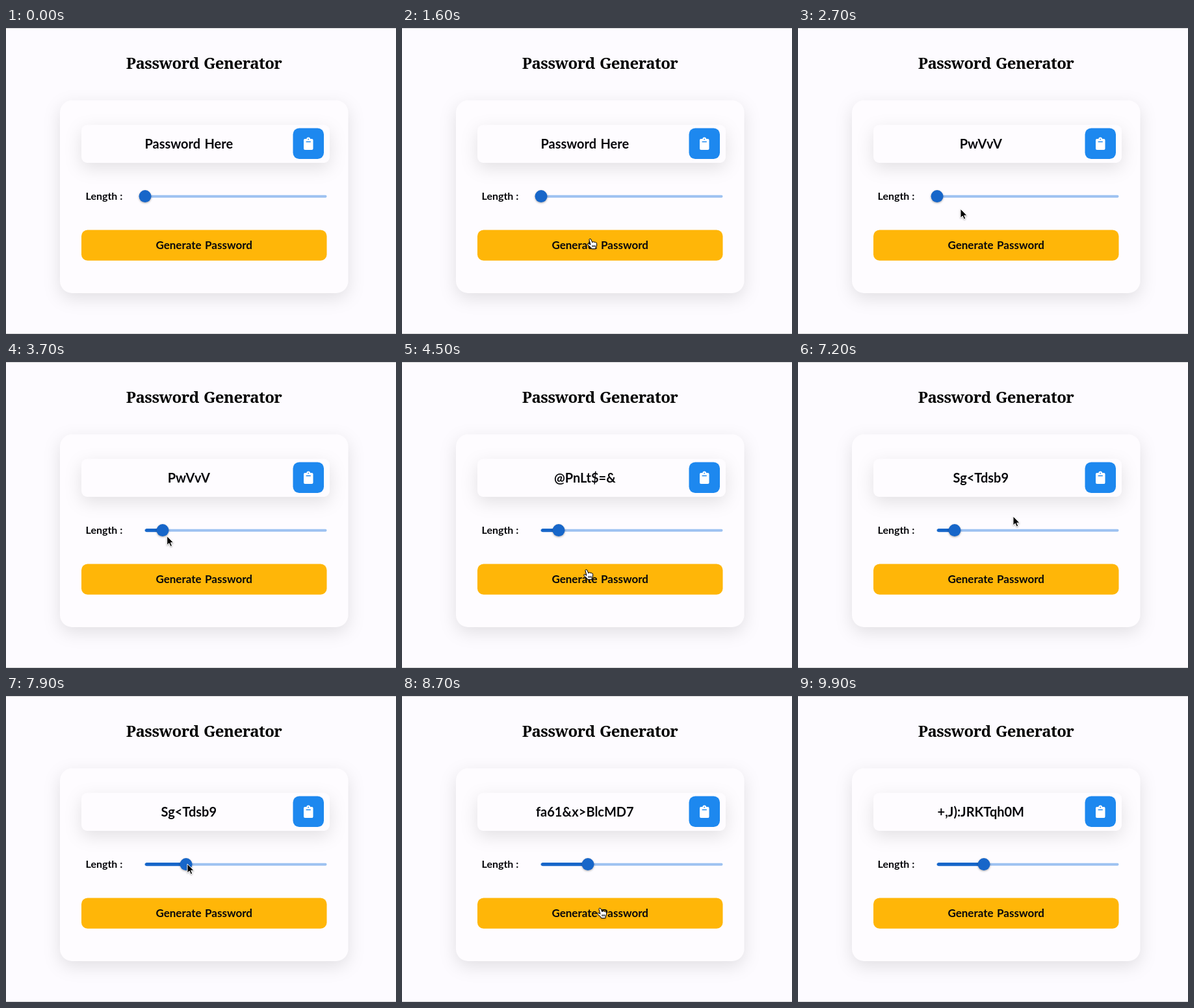
Write an HTML page that moves like this. It is 600 px wide and 472 px high and loops after 10 s.

```html
<!DOCTYPE html>
<html lang="en">
<head>
<meta charset="utf-8">
<title>Password Generator</title>
<style>
  html, body { margin: 0; width: 100%; height: 100%; overflow: hidden; background: #fdfbff; }
  svg { display: block; }
  text { font: 700 20px Lato, sans-serif; fill: #08080c; word-spacing: 1.5px; }
  .middle { text-anchor: middle; }
  .title { font: 700 24px "Noto Serif", serif; letter-spacing: -.55px; fill: #000; }
  .label { font-size: 16px; word-spacing: 0; }
  .action { font-size: 17px; }
  .panel { fill: #fefcff; filter: drop-shadow(0 8px 13px rgba(0, 0, 0, .11)); }
  .track { fill: #9ec2f1; }
  .active { fill: #1766c9; }
  #knob { filter: drop-shadow(0 1px 1.5px rgba(0, 0, 0, .35)); }
  #cursor { filter: drop-shadow(0 1px 1px rgba(0, 0, 0, .3)); }
</style>
</head>
<body>
<svg width="600" height="472" viewBox="0 0 600 472">
  <path d="M0 .5H600M0 471.5H600" stroke="#d2d1d4"/>
  <text class="title middle" x="304.5" y="63">Password Generator</text>
  <rect class="panel" x="83" y="111.5" width="443.5" height="297.5" rx="19"/>
  <rect class="panel" x="116" y="149.5" width="382" height="58.5" rx="9"/>
  <text id="password" class="middle" x="281.3" y="185.5"></text>

  <rect x="441.5" y="154.5" width="47.5" height="47.5" rx="9.5" fill="#1d88ef"/>
  <rect x="458" y="171" width="14.5" height="17" rx="2" fill="#fff"/>
  <circle cx="465.2" cy="171.4" r="2.8" fill="#fff"/>
  <path d="M461.6 175.5H468.8" stroke="#1d88ef" stroke-width="1.5"/>
  <circle cx="465.2" cy="171.6" r=".9" fill="#1d88ef"/>

  <text class="label" x="122.5" y="265.3">Length :</text>
  <rect class="track" x="213" y="257.7" width="280.5" height="4" rx="2"/>
  <rect id="fill" class="active" x="214" y="257" height="5.2" rx="2.6"/>
  <circle id="knob" class="active" cy="259.6" r="9.5"/>

  <rect x="116" y="311.5" width="377.5" height="47.2" rx="9.5" fill="#ffb608"/>
  <text class="action middle" x="304.7" y="341">Generate Password</text>

  <g id="cursor">
    <path id="arrow" d="M0 0V14L3.2 11L5.4 16L7.8 15L5.7 10.2H10Z" fill="#000" stroke="#fff"/>
    <path id="hand" d="M-2 1.6Q-1.6-.6 .5 .6L3 6L3.5 5Q5 4 6 5.5Q7.5 4.6 8.2 6.2Q9.5 5.6 9.6 7.5L9.4 11L8 13.5V15.5H1.5L1 14L-4 9.5Q-5 7.6-3 7.5L0 9.3ZM3 10V13M5 10V13M7 10V13"
          fill="#fff" stroke="#000" stroke-linejoin="round"/>
  </g>
</svg>
<script>
  const LOOP = 10000, STEP = 100, GLIDE = 400;
  const SLIDER_LEFT = 214, NOTCH = 9;
  const $ = id => document.getElementById(id);

  // Pointer stops, each reached at time `at` after one glide
  const stops = [
    { at: 900, x: 296, y: 418 },
    { at: 1500, x: 290, y: 325 },
    { at: 2700, x: 250, y: 279 },
    { at: 3100, x: 214, y: 259 },
    { at: 3500, x: 241, y: 259 },
    { at: 4000, x: 284, y: 320 },
    { at: 5600, x: 457, y: 176 },
    { at: 7200, x: 331, y: 238 },
    { at: 7600, x: 241, y: 259 },
    { at: 8000, x: 286, y: 259 },
    { at: 8400, x: 305, y: 327 },
    { at: 9500, x: 569, y: 300 }
  ];
  const passwords = ["Password Here", "PwVvV", "@PnLt$=&", "Sg<Tdsb9", "fa61&x>BlcMD7", "+,J):JRKTqh0M"];
  const clicks = [1800, 4200, 5000, 8500, 8900];

  // Eased progress, 0 to 1, of the glide that ends at time `at`
  function glide(t, at) {
    const u = Math.min(1, Math.max(0, 1 + (t - at) / GLIDE));
    return u * u * (3 - 2 * u);
  }

  const along = (axis, t) => stops.slice(1).reduce(
    (sum, stop, i) => sum + (stop[axis] - stops[i][axis]) * glide(t, stop.at), stops[0][axis]);

  const inside = (x, y, left, top, width, height) =>
    x >= left && x <= left + width && y >= top && y <= top + height;

  const show = (id, visible) => $(id).setAttribute("visibility", visible ? "visible" : "hidden");

  function draw(now) {
    const t = Math.floor(now % LOOP / STEP) * STEP;
    $("password").textContent = passwords[clicks.filter(click => click <= t).length];

    // Two drags lengthen the password by 3, then by 5
    const offset = NOTCH * Math.round(3 * glide(t, 3500) + 5 * glide(t, 8000));
    $("fill").setAttribute("width", offset);
    $("knob").setAttribute("cx", SLIDER_LEFT + offset);

    const x = along("x", t), y = along("y", t);
    const present = t >= stops[0].at && t <= stops.at(-1).at;
    const pointing = inside(x, y, 116, 312, 378, 47) || inside(x, y, 442, 155, 47, 47);
    $("cursor").setAttribute("transform", `translate(${x} ${y})`);
    show("hand", present && pointing);
    show("arrow", present && !pointing);
  }

  const start = performance.now();
  function tick() {
    draw(performance.now() - start);
    requestAnimationFrame(tick);
  }
  tick();
</script>
</body>
</html>
```
